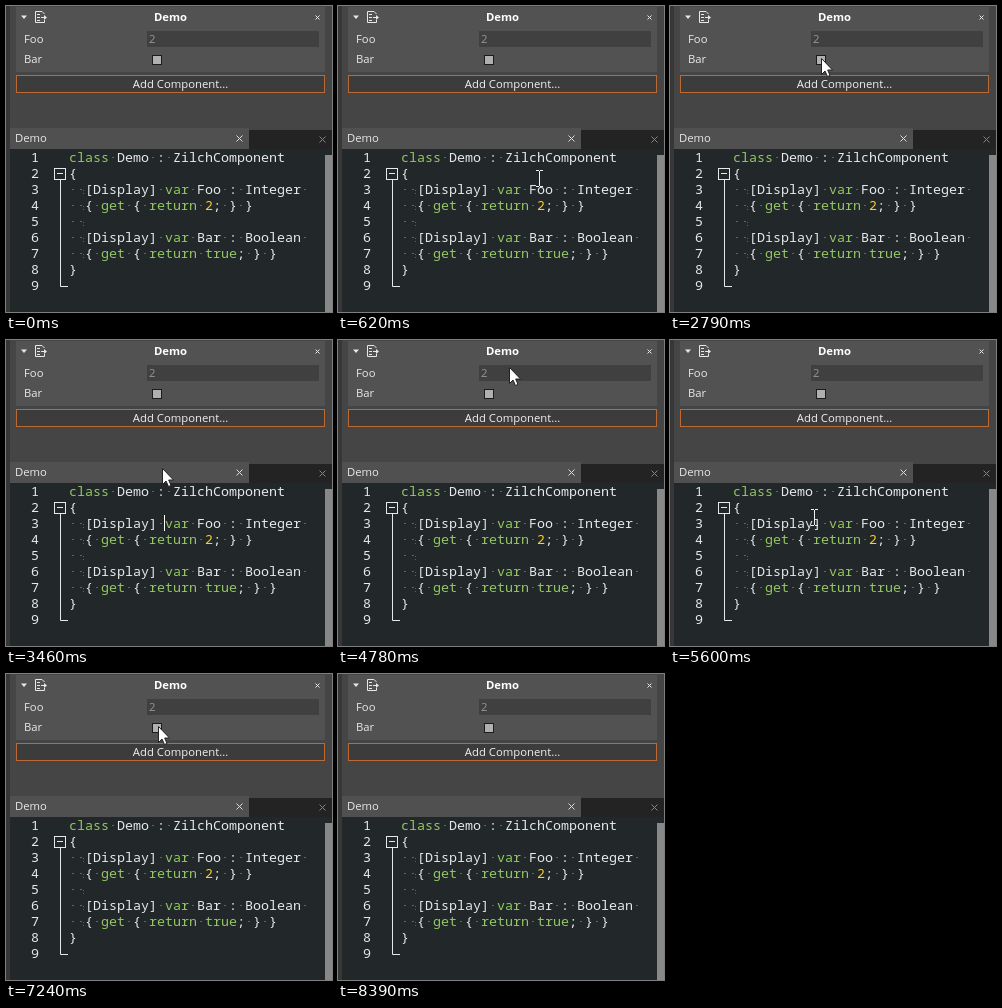
Animation, 326 px wide and 306 px high, one loop 8.85 s. Source, as an HTML page with a canvas:

```html
<!DOCTYPE html>
<html lang="en">
<head>
<meta charset="utf-8">
<title>Component editor</title>
<style>
html, body { margin: 0; width: 100%; height: 100%; overflow: hidden; background: #454545; }
canvas { display: block; }
</style>
</head>
<body>
<canvas id="stage" width="326" height="306"></canvas>
<script>
const ctx = document.getElementById('stage').getContext('2d');
const LOOP = 8850;
const UI = '11.3px "Open Sans", "Noto Sans", sans-serif';
const MONO = '13.333px "Noto Sans Mono", "DejaVu Sans Mono", monospace';
const CODE_X = 63, CODE_Y = 143, CHAR = 8, LINE = 16;
const WHITE = '#e6e8ea', GREEN = '#93c763', YELLOW = '#ffcd22', DOT = '#5c6669';

const code = [
  'class Demo : ZilchComponent',
  '{',
  '  [Display] var Foo : Integer ',
  '  { get { return 2; } }',
  '  ',
  '  [Display] var Bar : Boolean ',
  '  { get { return true; } }',
  '}',
  ''
];

// Drawing helpers
function rect(x, y, w, h, fill) {
  ctx.fillStyle = fill;
  ctx.fillRect(x, y, w, h);
}

function frame(x, y, w, h, color) {
  ctx.strokeStyle = color;
  ctx.lineWidth = 1;
  ctx.strokeRect(x + .5, y + .5, w - 1, h - 1);
}

function shape(points, fill, stroke, closed = true) {
  ctx.beginPath();
  points.forEach(([x, y]) => ctx.lineTo(x, y));
  if (closed) ctx.closePath();
  if (fill) { ctx.fillStyle = fill; ctx.fill(); }
  if (stroke) { ctx.strokeStyle = stroke; ctx.lineWidth = 1; ctx.stroke(); }
}

function text(str, x, y, color, font = UI, align = 'left') {
  ctx.font = font;
  ctx.textAlign = align;
  ctx.fillStyle = color;
  ctx.fillText(str, x, y);
}

function cross(x, y, r, color) {
  shape([[x - r, y - r], [x + r, y + r]], null, color, false);
  shape([[x - r, y + r], [x + r, y - r]], null, color, false);
}

// Pointer motion: each path maps progress 0..1 to a position
const { PI, sin, min } = Math;
const ease = u => u * u * (3 - 2 * u);
const mix = (a, b, u) => a.map((v, i) => v + (b[i] - v) * u);

const glide = (a, b) => u => mix(a, b, ease(u));

// Down into the code and back, swaying from side to side
const swoop = (a, b, depth, swing) => u => {
  const [x, y] = mix(a, b, ease(u));
  return [x - swing * sin(4 * PI * u), y + depth * sin(PI * u) ** 2];
};

// Drifting figure eights over the code, starting and ending at one spot
const eights = spot => u => {
  const reach = ease(min(1, u * 7, (1 - u) * 5));
  const phase = 2 * PI * (1.8 * u - .25);
  const [x, y] = mix([147, 175], [127, 189], u);
  return mix(spot, [x - 70 * sin(phase), y + 34 * sin(2 * phase)], reach);
};

const edge = [328, 280], foo = [37, 32], bar = [152, 52];
const field = [171, 27], aboveBar = [152, 33], belowBar = [151, 63], outside = [334, 308];

const moves = [
  { from: 260, to: 1050, path: glide(edge, foo) },
  { from: 1560, to: 2080, path: glide(foo, bar) },
  { from: 2790, to: 3680, path: swoop(bar, bar, 155, 88) },
  { from: 3680, to: 3820, path: glide(bar, aboveBar) },
  { from: 3990, to: 4610, path: swoop(aboveBar, field, 155, 78) },
  { from: 4780, to: 5180, path: glide(field, bar) },
  { from: 5350, to: 7150, path: eights(bar) },
  { from: 7670, to: 7730, path: glide(bar, belowBar) },
  { from: 8090, to: 8390, path: glide(belowBar, outside) }
];

function pointerAt(t) {
  const move = moves.findLast(m => t >= m.from);
  if (!move) return null;
  const u = min(1, (t - move.from) / (move.to - move.from));
  return move.path(u).map(Math.round);
}

function drawPanel() {
  rect(0, 0, 326, 306, '#454545');
  rect(0, 0, 4, 306, '#373737');
  rect(10, 1, 309, 65, '#525252');

  shape([[15, 9.5], [21, 9.5], [18, 13]], WHITE);
  shape([[38.5, 8], [36, 5.5], [29.5, 5.5], [29.5, 16.5], [38.5, 16.5], [38.5, 14]],
    null, WHITE, false);
  [8, 11, 14].forEach(y => rect(31, y, 3, 1, WHITE));
  rect(35, 11, 4, 1, WHITE);
  shape([[38, 9], [41, 11.5], [38, 14]], WHITE);
  text('Demo', 164.5, 15, '#ffffff', 'bold ' + UI, 'center');
  cross(311.5, 11.5, 2, WHITE);

  text('Foo', 18, 37, '#e8e8e8');
  rect(141, 25, 172, 16, '#404040');
  text('2', 143, 37, '#969696');
  text('Bar', 18, 57, '#e8e8e8');
  rect(146, 49, 10, 10, '#b0b0b0');
  frame(146, 49, 10, 10, '#1c1c1c');

  rect(10, 69, 309, 18, '#3c3c3c');
  frame(10, 69, 309, 18, '#bd6a32');
  text('Add Component...', 174.5, 82, '#f0f0f0', UI, 'center');
}

function drawTabs() {
  rect(4, 122, 239, 21, '#505050');
  rect(243, 124, 83, 19, '#232323');
  text('Demo', 9, 136, '#e8e8e8');
  cross(233.5, 132.5, 3, '#dddddd');
  cross(316.5, 133.5, 3, '#858585');
}

function tokenColor(word) {
  if (/^(class|var|get|return|true)$/.test(word)) return GREEN;
  return /^\d+$/.test(word) ? YELLOW : WHITE;
}

function drawLine(line, row) {
  const top = CODE_Y + row * LINE;
  text(row + 1, 33, top + 13, WHITE, MONO, 'right');
  for (const { 0: token, index } of line.matchAll(/\w+|[^\w\s]|\s/g)) {
    const x = CODE_X + index * CHAR;
    if (token !== ' ') text(token, x, top + 13, tokenColor(token), MONO);
    else rect(x + 3, top + 8, 2, 1, DOT);
  }
  if (line.startsWith('  ')) [9, 12].forEach(y => rect(77, top + y, 1, 1, DOT));
}

function drawEditor() {
  rect(4, CODE_Y, 322, 163, '#22282a');
  rect(319, 149, 7, 157, '#888888');
  code.forEach(drawLine);
  shape([[54.5, 174], [54.5, 280.5], [62, 280.5]], null, WHITE, false);
  frame(48, 162, 12, 12, WHITE);
  rect(51, 167, 6, 1, WHITE);
}

function drawCaret(x, row) {
  rect(x, CODE_Y + row * LINE, 1, LINE, '#ffffff');
}

function drawTooltip() {
  shape([[313.5, 32.5], [320.5, 25.5], [320.5, 18.5], [328, 18.5],
    [328, 46.5], [320.5, 46.5], [320.5, 39.5]], '#22608f', '#3c90c8');
}

function drawPointer([x, y]) {
  ctx.save();
  ctx.translate(x, y);
  if (y > CODE_Y + 5 && x < 319) {
    rect(0, -7, 1, 15, '#f0f0f0');
    [-8, 8].forEach(end => {
      rect(-3, end, 3, 1, '#f0f0f0');
      rect(1, end, 3, 1, '#f0f0f0');
    });
  } else {
    shape([[.5, .5], [.5, 16.5], [4, 13], [6.5, 18.5], [9, 17.5],
      [6.7, 12], [11.5, 12]], '#ffffff', '#222222');
  }
  ctx.restore();
}

function draw(t) {
  const during = (from, to) => t >= from && t < to;
  drawPanel();
  drawTabs();
  drawEditor();
  if (during(30, 560)) drawCaret(CODE_X, 8);
  if (during(3250, 3780)) drawCaret(158, 2);
  if (during(1000, 1620)) drawTooltip();
  const pointer = pointerAt(t);
  if (pointer) drawPointer(pointer);
}

const start = performance.now();
function tick() {
  draw((performance.now() - start) % LOOP);
  requestAnimationFrame(tick);
}
tick();
</script>
</body>
</html>
```
